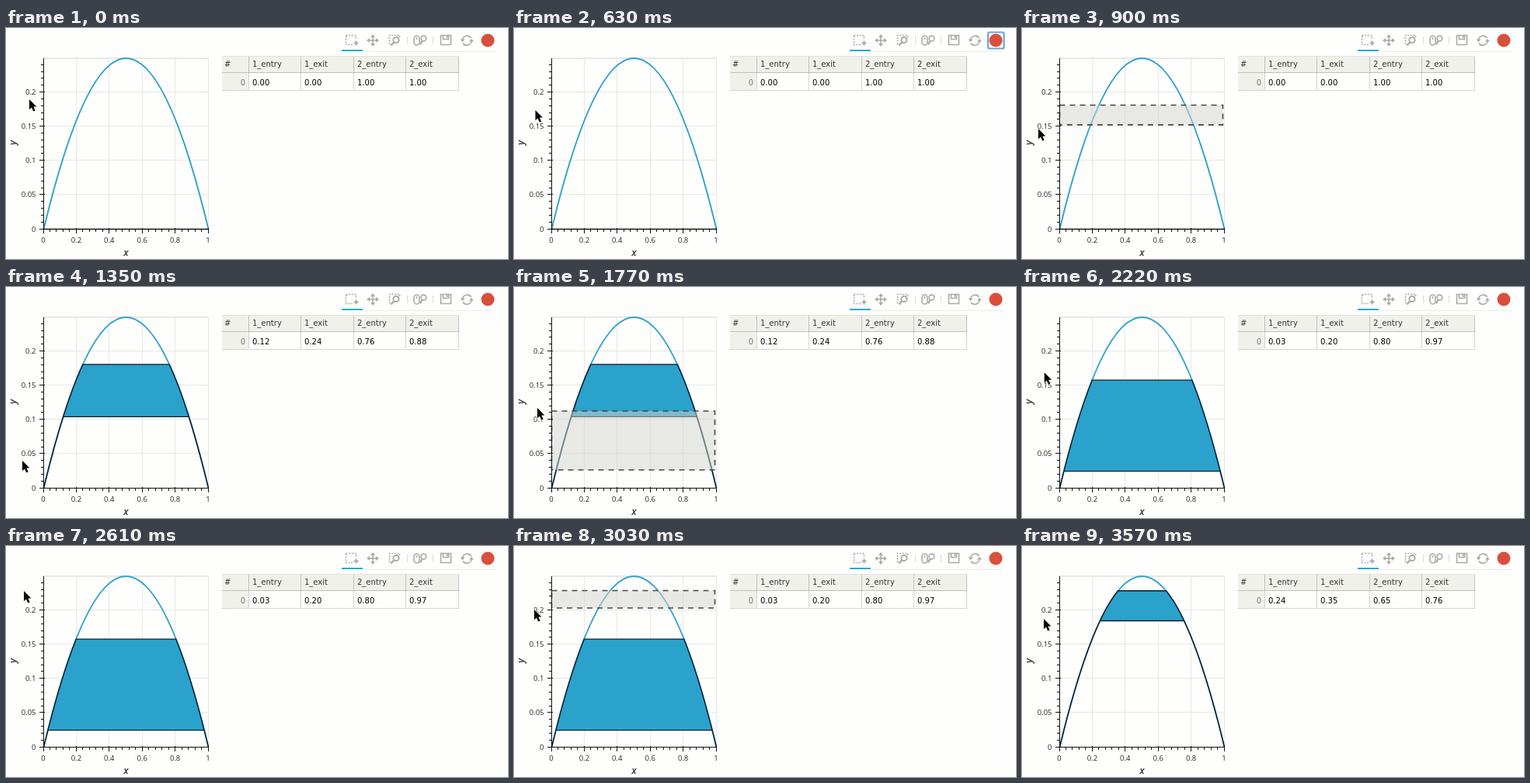
Write an HTML page that moves like this. It is 646 by 298 pixels and loops after 3.6 s.

```html
<!DOCTYPE html>
<html lang="en">
<head>
<meta charset="utf-8">
<title>Curve range selection</title>
<style>
  html, body { margin: 0; width: 100%; height: 100%; overflow: hidden; background: #fefefd; }
  svg { display: block; width: 646px; height: 298px; }
  text { font-family: "DejaVu Sans", Verdana, sans-serif; font-size: 10px; fill: #333; }
  #ticks text { font: 9.5px "Open Sans", sans-serif; fill: #222; }
  #ticks path { stroke: #111; fill: none; }
  .title { font: italic 600 12.5px "Open Sans", sans-serif; text-anchor: middle; }
  #grid { stroke: #e7e7e4; fill: none; }
  #curve { fill: none; stroke: #30a2cc; stroke-width: 1.9; }
  #fill { fill: #2aa2cc; }
  #edge { fill: none; stroke: #0c1a26; stroke-width: 1.4; }
  #box { fill: rgb(211 211 206 / .5); stroke: #444; stroke-width: 1.6; stroke-dasharray: 7 6; }
  .icon { fill: none; stroke: #aaaca6; stroke-width: 1.6; }
  .solid { fill: #aaaca6; stroke: none; }
  .dots { stroke-dasharray: 2 1.6; }
  #values text { fill: #000; }
</style>
</head>
<body>
<svg viewBox="0 0 646 298">
  <!-- toolbar -->
  <path d="M459 30.5H630" stroke="#ebebe6"/>
  <path d="M432 29H459" stroke="#26aad4" stroke-width="2"/>
  <path d="M516.5 11V21M549.5 11V21" stroke="#dcdcd6"/>
  <g class="icon">
    <path class="dots" d="M437.5 9.5H450.5V15M446 21.5H437.5V9.5"/>
    <path d="M447.5 19.5H453.5M450.5 16.5V22.5" stroke-width="2"/>
    <path d="M472 10V22M466 16H478"/>
    <path class="solid" d="M472 8l3 4h-6zM472 24l3-4h-6zM464 16l4-3v6zM480 16l-4-3v6z"/>
    <path class="dots" d="M506.5 12V9.5H493.5V21.5H497"/>
    <circle cx="502" cy="15.5" r="3.6" stroke-width="2"/>
    <path d="M499.5 18L495.5 22.5" stroke-width="2.4"/>
    <rect x="525" y="10" width="7" height="12" rx="3.5"/>
    <path d="M528.5 12V15"/>
    <circle cx="537.5" cy="13.5" r="3.4"/>
    <path d="M535.5 16.5L533 21.5" stroke-width="2.2"/>
    <path d="M559.5 9.5H572.5V21.5H559.5Z"/>
    <path d="M562.5 10V14.5H569.5V10M567.5 10V13"/>
    <path d="M587.5 15A6 6 0 0 1 598.5 13M599 17A6 6 0 0 1 588 19.5"/>
    <path class="solid" d="M584.5 14.5h6l-3 3.8zM596 17.5h6l-3-3.8z"/>
  </g>
  <circle cx="620" cy="16" r="8.5" fill="#d8503c"/>
  <rect id="ring" x="610" y="5.5" width="20.5" height="21" rx="2" fill="none" stroke="#69a6dc" stroke-width="2.2"/>

  <!-- table -->
  <path d="M278 36H583V57H278ZM278 58H312V80H278Z" fill="#f1f1ec"/>
  <path d="M278 36.5H583" stroke="#e2e2da"/>
  <path d="M278 57.5H583M312.5 37V57M379.5 37V57M447.5 37V57M514.5 37V57M582.5 37V57" stroke="#c0c0ba"/>
  <path d="M278 80.5H583M312.5 58V80M379.5 58V80M447.5 58V80M514.5 58V80M582.5 58V80" stroke="#aaaaa6" stroke-dasharray="1 1"/>
  <text x="281" y="50">#</text>
  <text x="308" y="74" text-anchor="end" style="fill:#777">0</text>
  <g id="heads"></g>
  <g id="values"></g>

  <!-- plot -->
  <path id="grid"/>
  <path id="curve"/>
  <path id="fill"/>
  <path id="edge"/>
  <rect id="box" x="48.5" width="210"/>
  <g id="ticks"></g>
  <text class="title" x="154.5" y="294">x</text>
  <text class="title" transform="translate(13 148) rotate(-90)">y</text>

  <path id="cursor" d="M0 0V13.2L3 10.4L5.2 15.4L7.6 14.4L5.4 9.6H9.4Z" fill="#000" stroke="#fff" stroke-width="1.2" paint-order="stroke"/>
</svg>
<script>
const LOOP = 3600, STEP = 30;
const $ = id => document.getElementById(id);
const px = x => 48.5 + 212 * x;
const py = y => 259.5 - 882 * y;
const f = x => x * (1 - x);
const root = y => (1 - Math.sqrt(1 - 4 * y)) / 2;
const pt = x => `${px(x)} ${py(f(x))}`;

// Exact piece of the parabola from a to b, as one quadratic curve
const arc = (a, b) =>
  `Q${px((a + b) / 2)} ${py(f(a) + (1 - 2 * a) * (b - a) / 2)} ${pt(b)}`;

// Pointer: time, x, y
const track = [
  [0, 30, 92], [300, 28, 98], [540, 27.5, 106], [630, 27.5, 106], [720, 27, 99],
  [900, 21, 130], [1080, 15.5, 167], [1140, 13.5, 172], [1350, 21, 224],
  [1470, 22, 236], [1530, 22, 235], [1740, 29, 160], [1770, 30, 156],
  [2040, 31, 120], [2070, 31, 118], [2160, 30, 119], [2400, 25, 84],
  [2610, 23, 58], [2670, 23, 57], [2940, 25, 76], [3210, 28, 94], [3600, 28, 94]
];

const drags = [
  { from: 720, to: 1110, y: 99.5, lo: 0.1045, hi: 0.181 },
  { from: 1500, to: 2160, y: 236, lo: 0.0248, hi: 0.158 },
  { from: 2670, to: 3270, y: 57.5, lo: 0.1848, hi: 0.2288 }
];

function pointer(t) {
  const i = track.findIndex(k => k[0] > t);
  const [t0, x0, y0] = track[i - 1], [t1, x1, y1] = track[i];
  const p = (t - t0) / (t1 - t0);
  return [x0 + (x1 - x0) * p, y0 + (y1 - y0) * p];
}

function buildPlot() {
  let grid = "M48 39.5H260.5V260", axes = "M48.5 39V260M48 259.5H261", labels = "";
  for (let i = 0; i <= 25; i++) {
    const x = Math.round(px(i / 25)) - 0.5, y = Math.round(py(i / 100)) - 0.5;
    const major = i % 5 === 0, inside = i < 25;
    axes += `M${x} ${major ? 258 : 260}V${major ? 265 : 263}`;
    if (inside) axes += `M${major ? 43 : 45} ${y}H${major ? 50 : 48}`;
    if (!major) continue;
    grid += `M${x} 39V259M48 ${y}H260`;
    labels += `<text x="${px(i / 25) - 0.5}" y="276.5" text-anchor="middle">${i / 25}</text>`;
    if (inside) labels += `<text x="38.5" y="${y + 3.5}" text-anchor="end">${i / 100}</text>`;
  }
  $("grid").setAttribute("d", grid);
  $("curve").setAttribute("d", `M${pt(0)}${arc(0, 1)}`);
  $("ticks").innerHTML = `<path d="${axes}"/>${labels}`;
}

const columns = ["1_entry", "1_exit", "2_entry", "2_exit"];
const colX = [317, 384, 452, 519];
const row = (items, y) => items.map((s, i) => `<text x="${colX[i]}" y="${y}">${s}</text>`).join("");

let shown;
function showRange(range) {
  if (range === shown) return;
  shown = range;
  const a = root(range.lo), b = root(range.hi);
  $("fill").setAttribute("d", `M${pt(a)}${arc(a, b)}L${pt(1 - b)}${arc(1 - b, 1 - a)}Z`);
  $("edge").setAttribute("d",
    `M${pt(0)}${arc(0, b)}L${pt(1 - b)}${arc(1 - b, 1)}M${pt(a)}L${pt(1 - a)}`);
  $("values").innerHTML = row([a, b, 1 - b, 1 - a].map(v => v.toFixed(2)), 74);
}

const none = { lo: 0, hi: 0 };
const toggle = (el, on) => el.style.visibility = on ? "visible" : "hidden";

function draw(t) {
  const [x, y] = pointer(t);
  $("cursor").setAttribute("transform", `translate(${x} ${y})`);
  toggle($("ring"), t >= 390 && t < 720);
  showRange(drags.filter(d => t >= d.to).pop() || none);

  const drag = drags.find(d => t >= d.from && t < d.to);
  toggle($("box"), drag);
  if (drag) {
    // The box trails the pointer by one step
    const edge = pointer(t - STEP)[1];
    $("box").setAttribute("y", Math.min(edge, drag.y));
    $("box").setAttribute("height", Math.abs(edge - drag.y));
  }
}

buildPlot();
$("heads").innerHTML = row(columns, 50);

const start = performance.now();
function tick() {
  const t = (performance.now() - start) % LOOP;
  draw(Math.floor(t / STEP) * STEP);
  requestAnimationFrame(tick);
}
tick();
</script>
</body>
</html>
```
